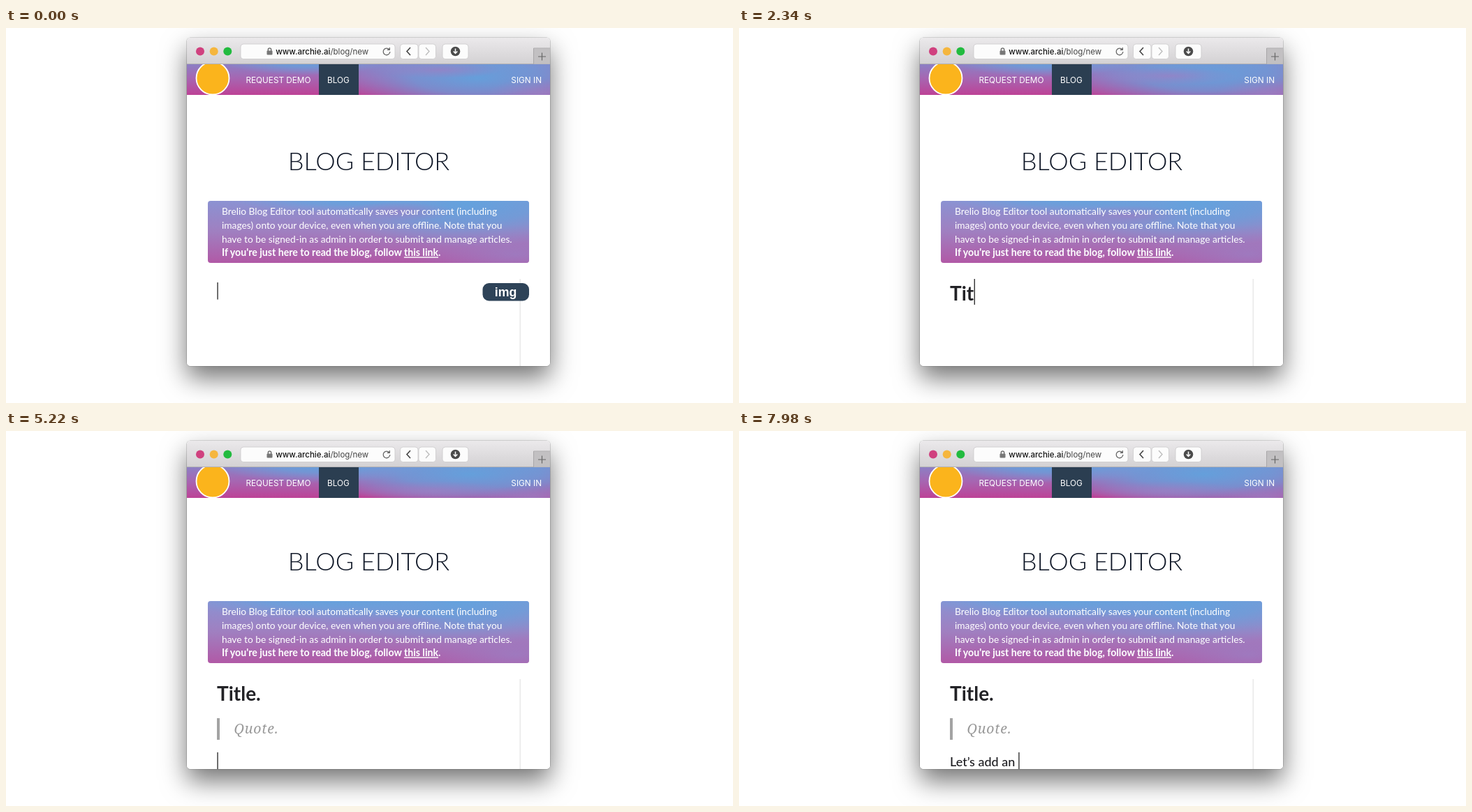
Recreate the animation shown at these times as an HTML page. Size 1041 by 538 pixels, loop 8000 ms.

```html
<!DOCTYPE html>
<html lang="en">
<head>
<meta charset="utf-8">
<title>Blog editor</title>
<style>
  html, body { margin: 0; width: 100%; height: 100%; overflow: hidden; background: #fff; }
  .window { position: absolute; left: 259px; top: 14px; width: 520px; height: 471px; border-radius: 5px;
    box-shadow: 0 0 0 .6px rgba(0,0,0,.25), 0 17px 36px rgba(0,0,0,.55); }
  svg { position: absolute; left: 0; top: 0; display: block; }
  .ui { font-family: Inter, sans-serif; }
  .nav { font-size: 11.75px; fill: #fff; }
  .lato { font-family: Lato, sans-serif; }
  .note { font-size: 13.75px; fill: #fff; }
  .note .strong { font-size: 14.15px; font-weight: 700; }
  .button { font: bold 17.8px "Liberation Sans", Arial, sans-serif; fill: #fff; text-anchor: middle; }
</style>
</head>
<body>
<div class="window"></div>
<svg width="1041" height="538" viewBox="0 0 1041 538">
  <defs>
    <linearGradient id="chrome" x2="0" y2="1"><stop stop-color="#ebe9eb"/><stop offset="1" stop-color="#d3d1d3"/></linearGradient>
    <linearGradient id="navFill" x2="0" y2="1"><stop stop-color="#8c7fc4"/><stop offset=".45" stop-color="#a666b2"/><stop offset="1" stop-color="#bd4296"/></linearGradient>
    <linearGradient id="noteFill" x2="0" y2="1"><stop stop-color="#8b92d2"/><stop offset=".5" stop-color="#a07fc0"/><stop offset="1" stop-color="#b159a6"/></linearGradient>
    <radialGradient id="blue"><stop stop-color="#60a3de" stop-opacity=".92"/><stop offset=".45" stop-color="#66a1dc" stop-opacity=".72"/><stop offset="1" stop-color="#729edb" stop-opacity="0"/></radialGradient>
    <radialGradient id="violet"><stop stop-color="#9a80c4" stop-opacity=".75"/><stop offset="1" stop-color="#9a80c4" stop-opacity="0"/></radialGradient>
    <clipPath id="frame"><rect x="259" y="14" width="520" height="471" rx="5"/></clipPath>
    <clipPath id="navClip"><rect x="259" y="52" width="520" height="44"/></clipPath>
    <clipPath id="noteClip"><rect x="289" y="248" width="460" height="89" rx="4"/></clipPath>
  </defs>
  <g clip-path="url(#frame)">
    <rect x="259" y="14" width="520" height="471" fill="#fff"/>

    <g id="page">
      <text class="lato" x="519.5" y="204" font-size="36" font-weight="300" fill="#0e1626" text-anchor="middle">BLOG EDITOR</text>
      <g clip-path="url(#noteClip)">
        <rect x="289" y="248" width="460" height="89" fill="url(#noteFill)"/>
        <g id="noteBlobs"></g>
      </g>
      <g class="lato note">
        <text x="309" y="268.3">Brelio Blog Editor tool automatically saves your content (including</text>
        <text x="309" y="288">images) onto your device, even when you are offline. Note that you</text>
        <text x="309" y="307.7">have to be signed-in as admin in order to submit and manage articles.</text>
        <text x="309" y="327.3" class="strong">If you're just here to read the blog, follow <tspan text-decoration="underline">this link</tspan>.</text>
      </g>
      <rect x="735.5" y="360" width="1.5" height="130" fill="#e9e9e9"/>
      <text id="title" class="lato" x="302" y="391" font-size="28" font-weight="700" fill="#222226"></text>
      <rect id="bar" x="302" y="416" width="4" height="31" fill="#a3a3a3"/>
      <text id="quote" x="326.5" y="438" font-family="Noto Serif, serif" font-style="italic" font-size="19.5" letter-spacing=".8" fill="#999"></text>
      <text id="body" class="lato" x="302" y="485" font-size="18" font-weight="500" fill="#1c1c20"></text>
      <rect id="caret" width="1.3" fill="#222"/>
      <g id="image" class="button">
        <rect x="682.5" y="366" width="66.5" height="25.5" rx="9" fill="#2e4358"/><text x="715.5" y="385">img</text>
      </g>
      <g id="unquote" class="button">
        <rect x="269" y="394" width="120" height="25.5" rx="9" fill="#2e4358"/><text x="328.5" y="413">Unqoute</text>
      </g>
    </g>

    <g clip-path="url(#navClip)">
      <rect x="259" y="52" width="520" height="44" fill="url(#navFill)"/>
      <g id="navBlobs"></g>
      <rect x="448" y="52" width="57" height="44" fill="#2b3e51"/>
      <circle cx="296" cy="72" r="23.5" fill="#fbb41c" stroke="#fff" stroke-width="1.8"/>
      <g class="ui nav">
        <text x="343.5" y="79">REQUEST DEMO</text>
        <text x="460" y="79">BLOG</text>
        <text x="767" y="79" text-anchor="end">SIGN IN</text>
      </g>
    </g>
    <rect id="scrollbar" x="770" y="56" width="7" height="125" rx="3.5" fill="#777" fill-opacity=".75"/>

    <rect x="259" y="14" width="520" height="38" fill="url(#chrome)"/>
    <rect x="259" y="51" width="520" height="1" fill="#b3b1b3"/>
    <circle cx="278" cy="33.5" r="6" fill="#d0417f"/>
    <circle cx="297.7" cy="33.5" r="6" fill="#f5b63e"/>
    <circle cx="317.3" cy="33.5" r="6" fill="#22bb3f"/>
    <g fill="#fcfcfc" stroke="#cbc9cb" stroke-width=".8">
      <rect x="336" y="23" width="221" height="21.5" rx="4"/>
      <rect x="564.5" y="23" width="25.5" height="21.5" rx="4"/>
      <rect x="591" y="23" width="24.5" height="21.5" rx="4"/>
      <rect x="625" y="23" width="37" height="21.5" rx="4"/>
    </g>
    <rect x="373.5" y="32.5" width="8" height="6" rx="1" fill="#777"/>
    <g fill="none" stroke-width="1.3" stroke="#666">
      <path d="M375.3 33v-2a2.2 2.2 0 0 1 4.4 0v2"/>
      <path d="M548.8 31A4.8 4.8 0 1 0 549.8 34M549.3 28v3.4h-3.5"/>
      <path d="M579 28l-5 5.5 5 5.5" stroke="#444" stroke-width="1.6"/>
      <path d="M601 28l5 5.5-5 5.5" stroke="#bbb"/>
    </g>
    <circle cx="643.5" cy="33.5" r="6.8" fill="#4b4b4b"/>
    <path d="M643.5 29.5v6M640.7 33.4l2.8 3 2.8-3" fill="none" stroke="#fff" stroke-width="1.5"/>
    <text class="ui" x="386.3" y="38" font-size="11.5" font-weight="500" fill="#151515">www.archie.ai<tspan font-weight="400" fill="#444">/blog/new</tspan></text>
    <path d="M755.5 52V29H779" fill="#c2c0c2" stroke="#a9a7a9"/>
    <rect x="756" y="29.5" width="23" height="22" fill="#c2c0c2"/>
    <path d="M762 41h11M767.5 35.5v11" stroke="#666" stroke-width="1.2"/>
  </g>
</svg>
<script>
const $ = id => document.getElementById(id);
const LOOP = 8000, ENTER_QUOTE = 3100, QUOTE_ON = 3600, ENTER_BODY = 5100;

// Soft colour patches: fill, then [cx, cy, rx, ry] at the start and end of the drift.
const patches = {
  navBlobs: [
    ['blue', [675, 72, 200, 50], [665, 62, 220, 46]],
    ['blue', [430, 46, 120, 22], [450, 47, 150, 28]],
    ['violet', [620, 60, 90, 12], [610, 86, 115, 14]],
    ['violet', [765, 94, 75, 22], [755, 96, 85, 18]]
  ],
  noteBlobs: [
    ['blue', [660, 252, 210, 62], [645, 248, 235, 62]],
    ['blue', [480, 244, 160, 22], [450, 244, 200, 30]],
    ['violet', [560, 264, 85, 14], [550, 280, 110, 16]],
    ['violet', [730, 325, 150, 42], [730, 325, 150, 42]]
  ]
};
const blobs = Object.entries(patches).flatMap(([parent, list]) => list.map(([fill, from, to]) => {
  const el = document.createElementNS('http://www.w3.org/2000/svg', 'ellipse');
  el.setAttribute('fill', `url(#${fill})`);
  $(parent).append(el);
  return { el, from, to };
}));

function set(el, attrs) {
  for (const name in attrs) el.setAttribute(name, attrs[name]);
}
const show = (id, on) => set($(id), { opacity: +on });
const clamp = v => Math.max(0, Math.min(1, v));

function type(id, text, t, start, step) {
  const count = Math.max(0, Math.floor((t - start) / step) + 1);
  const shown = text.slice(0, count).replace(/ /g, '\u00a0');
  if ($(id).textContent !== shown) $(id).textContent = shown;
  return shown.length;
}

function placeCaret(id, y, height) {
  const el = $(id);
  const width = el.textContent ? el.getComputedTextLength() : 0;
  set($('caret'), { x: +el.getAttribute('x') + width + .4, y, height });
}

function draw(now) {
  const t = now % LOOP;
  const drift = clamp((t - 1000) / 4000);
  for (const { el, from, to } of blobs) {
    const [cx, cy, rx, ry] = from.map((v, i) => v + (to[i] - v) * drift);
    set(el, { cx, cy, rx, ry });
  }

  const titled = type('title', 'Title.', t, 2000, 150);
  type('quote', 'Quote.', t, 4260, 140);
  type('body', 'Let’s add an ', t, 5600, 180);

  if (t >= ENTER_BODY) placeCaret('body', 465, 25);
  else if (t >= QUOTE_ON) placeCaret('quote', 419, 24.5);
  else if (t >= ENTER_QUOTE) placeCaret('body', 419, 24.5);
  else if (titled) placeCaret('title', 360, 37);
  else placeCaret('title', 365, 24.5);

  show('image', !titled);
  show('bar', t >= QUOTE_ON);
  show('unquote', t >= QUOTE_ON && t < ENTER_BODY);
  set($('page'), { transform: `translate(0 ${t >= ENTER_BODY ? -4 : 0})` });
  set($('scrollbar'), { opacity: t < 5800 ? 0 : clamp((7000 - t) / 250) });
  requestAnimationFrame(() => draw(performance.now()));
}
draw(performance.now());
</script>
</body>
</html>
```
